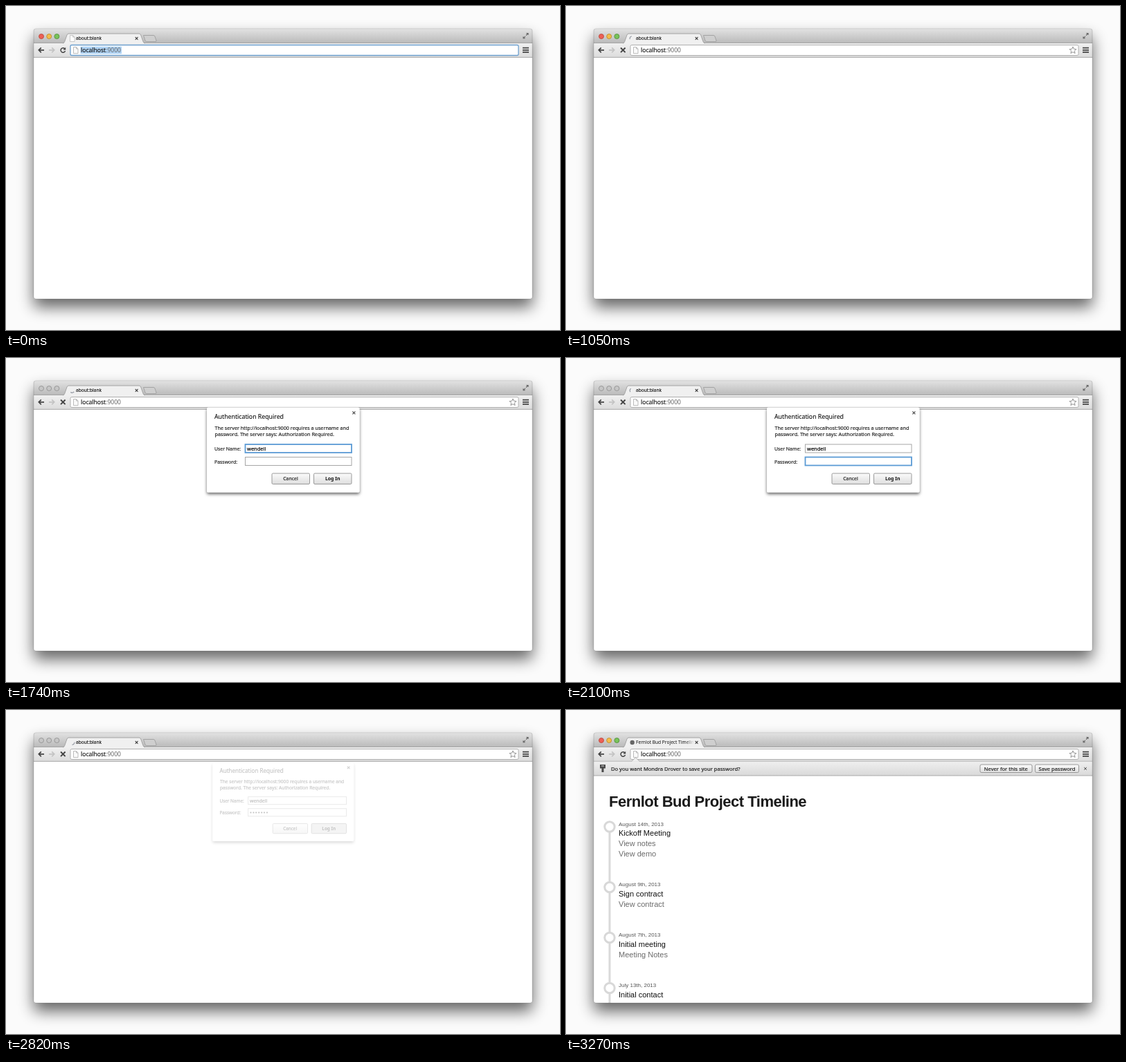
Write an HTML page that moves like this. It is 800 px wide and 469 px high and loops after 4.56 s.

```html
<!DOCTYPE html>
<html lang="en">
<head>
<meta charset="utf-8">
<title>Login flow</title>
<style>
  html, body { margin: 0; width: 100%; height: 100%; overflow: hidden; background: #fbfbfb; }
  svg { display: block; width: 800px; height: 469px; }
  text { font-family: "Noto Sans", "Open Sans", sans-serif; fill: #111; white-space: pre; }
  .ui text { stroke: #111; stroke-width: .12px; }
  .ui .bold { font-weight: 700; stroke: none; }
  .icon { fill: none; stroke: #444; stroke-width: 1.7; }
  .page text { font-family: "Liberation Sans", Arial, sans-serif; font-size: 11px; }
  .page .heading { font-size: 22px; font-weight: 700; letter-spacing: -.5px; fill: #1a1a1a; }
  .page .date { font-size: 8px; fill: #555; }
  .page .link { fill: #6b6b6b; }
  .button { fill: url(#buttonFill); stroke: #8f8f8f; stroke-width: .9; }
  .field { fill: #fff; stroke: #a6a6a6; stroke-width: 1; }
  .field.focus { stroke: #5b9bd5; stroke-width: 1.8; }
  .light { stroke-width: .8; }
  .inactive .light { fill: #c6c6c6; stroke: #8c8c8c; }
  .button.pressed { fill: #d6d6d6; stroke: #777; }
  .url { fill: #fff; stroke: #b0b0b0; }
  .url.focus { stroke: #6d9fce; stroke-width: 1.3; }
</style>
</head>
<body>
<svg viewBox="0 0 800 469">
  <defs>
    <linearGradient id="titleFill" x2="0" y2="1"><stop stop-color="#e2e2e2"/><stop offset="1" stop-color="#b9b9b9"/></linearGradient>
    <linearGradient id="toolFill" x2="0" y2="1"><stop stop-color="#f0f0f0"/><stop offset="1" stop-color="#dcdcdc"/></linearGradient>
    <linearGradient id="barFill" x2="0" y2="1"><stop stop-color="#efefef"/><stop offset="1" stop-color="#d9d9d9"/></linearGradient>
    <linearGradient id="buttonFill" x2="0" y2="1"><stop stop-color="#fbfbfb"/><stop offset="1" stop-color="#dedede"/></linearGradient>
    <linearGradient id="tabFade" gradientUnits="userSpaceOnUse" x1="172" x2="185" y1="0" y2="0">
      <stop stop-color="#111"/><stop offset="1" stop-color="#111" stop-opacity="0"/>
    </linearGradient>
    <filter id="windowShadow" x="-10%" y="-20%" width="120%" height="140%"><feGaussianBlur stdDeviation="11"/></filter>
    <filter id="sheetShadow" x="-10%" y="-15%" width="120%" height="130%">
      <feDropShadow dx="0" dy="2.5" stdDeviation="2.2" flood-opacity=".6"/>
    </filter>
    <clipPath id="windowClip"><rect x="40" y="33" width="720" height="391" rx="3"/></clipPath>
    <clipPath id="barClip"><rect x="40" y="71.5" width="720" height="40"/></clipPath>
  </defs>

  <rect width="800" height="469" fill="#fbfbfb"/>
  <rect x="40" y="45" width="720" height="391" rx="4" opacity=".6" filter="url(#windowShadow)"/>

  <g clip-path="url(#windowClip)">
    <rect x="40" y="33" width="720" height="391" fill="#fff"/>
    <g id="page" class="page">
      <text class="heading" x="62" y="140">Fernlot Bud Project Timeline</text>
      <path d="M63 169V460" stroke="#dadada" stroke-width="3"/>
    </g>

    <g class="ui">
      <rect x="40" y="33" width="720" height="21" fill="url(#titleFill)"/>
      <path d="M40 33.4H760" stroke="#efefef" stroke-width=".8"/>
      <path d="M40 53.7H760" stroke="#999" stroke-width=".8"/>
      <g id="lights">
        <circle class="light" cx="51" cy="44" r="3.5" fill="#ee6055" stroke="#b5443c"/>
        <circle class="light" cx="62.2" cy="44" r="3.5" fill="#f3bd4c" stroke="#b98528"/>
        <circle class="light" cx="73.4" cy="44" r="3.5" fill="#79c35a" stroke="#4c8a35"/>
      </g>
      <path d="M198.5 42.5H213q1.5 0 2 1.5l2 6q.5 1.5-1 1.5H203q-1.500 0-2-1.500z" fill="#cfcfcf" stroke="#9a9a9a" stroke-width=".8"/>
      <rect x="40" y="54" width="720" height="20.500" fill="url(#toolFill)"/>
      <path d="M40 74.300H760" stroke="#a2a2a2" stroke-width=".9"/>
      <path d="M82 54.300q2-.5 2.700-2.500l3.300-9.500q.700-2 2.700-2H192q2 0 2.700 2l3.300 9.500q.700 2 2.700 2.500z" fill="#f0f0f0"/>
      <path d="M82 54q2-.5 2.700-2.500l3.300-9.500q.700-2 2.700-2H192q2 0 2.700 2l3.300 9.500q.700 2 2.700 2.500" fill="none" stroke="#999" stroke-width=".8"/>
      <path class="icon" d="M186.700 45l3.800 3.800m0-3.800l-3.800 3.800" stroke-width="1" style="stroke-width:1.100"/>

      <!-- tab contents -->
      <path id="tabFile" d="M92.500 42.500h4l2.500 2.500v6.500h-6.500zM96.500 42.500v2.500H99" fill="#fff" stroke="#b5b5b5" stroke-width=".7"/>
      <path id="spinner" d="M2.250-2.500A3.400 3.400 0 0 1 2.250 2.500" fill="none" stroke="#8b919c" stroke-width="1.100"/>
      <circle id="favicon" cx="95.700" cy="47" r="3.200" fill="#666"/>
      <text id="blankTitle" x="101" y="49.300" font-size="6.600">about:blank</text>
      <text id="pageTitle" x="101" y="49.300" font-size="6.600" style="fill:url(#tabFade);stroke:none">Fernlot Bud Project Timeline</text>

      <!-- toolbar -->
      <path d="M751 42.500l3-3m-2.600 0h2.600v2.600M750 43.800l-3 3m2.600 0H747v-2.600" fill="none" stroke="#666" stroke-width="1.100"/>
      <path class="icon" d="M55 63.800H47.500M50.800 60.300l-3.500 3.500 3.500 3.500"/>
      <path class="icon" d="M62 63.800h7.500M66.200 60.300l3.500 3.500-3.500 3.500" style="stroke:#c4c4c4"/>
      <g id="reload">
        <path class="icon" d="M84.800 61.700A3.300 3.300 0 1 0 85.500 65" style="stroke-width:1.500"/>
        <path d="M86.200 59.700v3.800h-3.800z" fill="#444"/>
      </g>
      <path id="stop" class="icon" d="M79 60.500l6.600 6.600m0-6.600l-6.600 6.600" style="stroke-width:1.900"/>
      <rect id="url" class="url" x="93" y="56.500" width="647" height="15" rx="2"/>
      <path d="M97.500 59.500h4l2.500 2.500v6.700h-6.500zM101.500 59.500v2.500h2.500" fill="#fafafa" stroke="#aaa" stroke-width=".8"/>
      <rect id="selection" x="107.500" y="58.700" width="59.500" height="10.600" fill="#b0d3f4"/>
      <text x="108" y="67" font-size="8.550">localhost<tspan fill="#666" stroke="none">:9000</tspan></text>
      <path id="star" fill="#fff" stroke="#8a8a8a" stroke-width=".9"/>
      <path class="icon" d="M746 60.700h9M746 63.800h9M746 66.900h9" style="stroke-width:1.800"/>

      <!-- password bar -->
      <g id="bar">
        <path id="barArrow" fill="#efefef" stroke="#a2a2a2" stroke-width=".8"/>
        <g clip-path="url(#barClip)"><g id="barBody">
          <rect x="40" y="74.700" width="720" height="20.300" fill="url(#barFill)"/>
          <path d="M40 95H760" stroke="#a2a2a2" stroke-width=".9"/>
          <path d="M49 79h8v5.500h-2.500V90h-3v-5.500H49z" fill="#4a4a4a"/>
          <path d="M51 81h4" stroke="#ddd" stroke-width="1"/>
          <text x="65" y="87.500" font-size="7.600">Do you want Mondra Drover to save your password?</text>
          <rect class="button" x="598" y="79" width="75" height="11.500" rx="2"/>
          <rect class="button" x="677.500" y="79" width="63" height="11.500" rx="2"/>
          <g font-size="7.600" text-anchor="middle">
            <text x="635.300" y="87.500">Never for this site</text>
            <text x="709" y="87.500">Save password</text>
          </g>
          <path class="icon" d="M748.200 83l3.600 3.600m0-3.600l-3.600 3.600" style="stroke-width:1"/>
        </g></g>
      </g>
    </g>
  </g>
  <rect x="40" y="33" width="720" height="391" rx="3" fill="none" stroke="#000" stroke-opacity=".25" stroke-width=".6"/>

  <!-- authentication sheet -->
  <g id="sheet" class="ui">
    <rect x="290" y="71.500" width="220.500" height="123" rx="2" fill="#fff" filter="url(#sheetShadow)"/>
    <path class="icon" d="M500.400 77.300l4 4m0-4l-4 4" style="stroke-width:1.100"/>
    <text x="301" y="88" font-size="8.750">Authentication Required</text>
    <g font-size="7.200">
      <text x="301.500" y="104">The server http://localhost:9000 requires a username and</text>
      <text x="301.500" y="113.300">password. The server says: Authorization Required.</text>
    </g>
    <g font-size="6.900">
      <text x="301" y="134.300">User Name:</text>
      <text x="301" y="152.500">Password:</text>
    </g>
    <rect id="userField" class="field" x="345.500" y="125" width="153.500" height="12"/>
    <rect id="passField" class="field" x="345.500" y="143.500" width="153.500" height="12"/>
    <text id="userText" x="348" y="134" font-size="7.500" style="stroke-width:.25px"></text>
    <text id="passText" x="347.500" y="152.500" font-size="7.200" style="font-family:'DejaVu Sans',sans-serif"></text>
    <rect class="button" x="384" y="167" width="54.500" height="15.500" rx="1.500"/>
    <rect id="login" class="button" x="444.500" y="167" width="54.500" height="15.500" rx="1.500"/>
    <g font-size="6.900" text-anchor="middle">
      <text x="411" y="177.300">Cancel</text>
      <text class="bold" x="471.700" y="177.300">Log In</text>
    </g>
  </g>
</svg>

<script>
const LOOP = 4560;
const T = {
  load: 750, spin: 900, sheetIn: 1080, sheetShown: 1230,
  typeUser: 1440, focusPass: 1770, typePass: 2220, submit: 2640,
  sheetOut: 2730, sheetGone: 2850, page: 3060, barIn: 3105, barDone: 3270
};
const USER = "wendell";
const $ = id => document.getElementById(id);
const clamp = v => Math.min(1, Math.max(0, v));
const progress = (t, from, to) => clamp((t - from) / (to - from));
const typed = (t, start, step) =>
  Math.max(0, Math.min(USER.length, Math.floor((t - start) / step) + 1));
const show = (id, on) => $(id).style.display = on ? "" : "none";
const flag = (id, name, on) => $(id).classList.toggle(name, on);

const entries = [
  [169, "August 14th, 2013", "Kickoff Meeting", "View notes", "View demo"],
  [256.5, "August 9th, 2013", "Sign contract", "View contract"],
  [329.5, "August 7th, 2013", "Initial meeting", "Meeting Notes"],
  [402.5, "July 13th, 2013", "Initial contact"]
];
$("page").innerHTML += entries.map(([y, date, title, ...links]) => `
  <circle cx="63" cy="${y}" r="7.200" fill="#fff" stroke="#d8d8d8" stroke-width="3"/>
  <text class="date" x="76" y="${y - 1.3}">${date}</text>
  <text x="76" y="${y + 13}">${title}</text>` +
  links.map((link, i) => `<text class="link" x="76" y="${y + 28 + 15 * i}">${link}</text>`).join("")
).join("");

const starPoints = Array.from({ length: 10 }, (_, i) => {
  const r = i % 2 ? 2.4 : 5.3, a = i * Math.PI / 5;
  return [732 + r * Math.sin(a), 64.2 - r * Math.cos(a)];
});
$("star").setAttribute("d", "M" + starPoints.join("L") + "Z");

function render(t) {
  const idle = t < T.load, loaded = t >= T.page, loading = !idle && !loaded;
  show("selection", idle);
  flag("url", "focus", idle);
  show("star", !idle);
  show("tabFile", idle);
  show("reload", !loading);
  show("stop", loading);
  show("spinner", loading);
  for (const id of ["favicon", "pageTitle", "page"]) show(id, loaded);
  show("blankTitle", !loaded);

  const angle = -43 - (Math.max(t, T.spin) - 1410) / 510 * 360;
  $("spinner").setAttribute("transform", `translate(95.500 47) rotate(${angle})`);

  const visible = progress(t, T.sheetIn, T.sheetShown) * (1 - progress(t, T.sheetOut, T.sheetGone));
  const scale = 0.9 + 0.1 * visible;
  show("sheet", visible > 0);
  flag("lights", "inactive", visible > 0);
  $("sheet").setAttribute("opacity", visible);
  $("sheet").setAttribute("transform", `translate(400 133) scale(${scale}) translate(-400 -133)`);

  $("userText").textContent = USER.slice(0, typed(t, T.typeUser, 45));
  $("passText").textContent = "•".repeat(typed(t, T.typePass, 60));
  flag("userField", "focus", t < T.focusPass);
  flag("passField", "focus", t >= T.focusPass && t < T.submit);
  flag("login", "pressed", t >= T.submit);

  // The bar slides over the page, which moves down only once it has settled.
  const slide = progress(t, T.barIn, T.barDone), arrow = 6 * slide;
  show("bar", slide > 0);
  $("barBody").setAttribute("transform", `translate(0 ${-20.5 * (1 - slide)})`);
  $("barArrow").setAttribute("d", `M${100.5 - arrow} 74.700L100.500 ${74.7 - arrow}L${100.5 + arrow} 74.700`);
  $("page").setAttribute("transform", `translate(0 ${slide < 1 ? -21 : 0})`);
}

function tick() {
  render(performance.now() % LOOP);
  requestAnimationFrame(tick);
}
tick();
</script>
</body>
</html>
```
